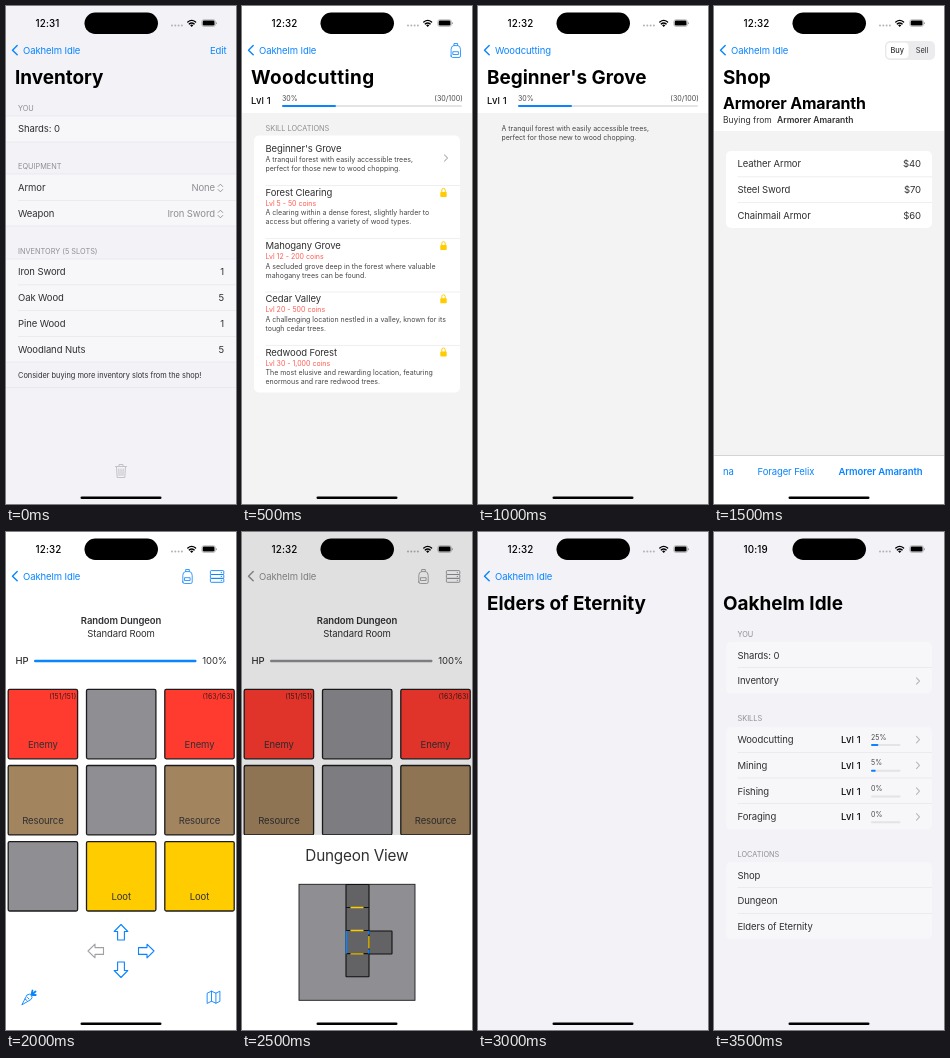
These frames come from a looping animation (230x498 px, 4000 ms). An HTML page:

```html
<!DOCTYPE html>
<html lang="en">
<head>
<meta charset="utf-8">
<title>Idle game screens</title>
<style>
  html, body { margin: 0; width: 100%; height: 100%; overflow: hidden; background: #fff; }
  svg { display: block; position: absolute; left: 0; top: 0; width: 230px; height: 498px; }
  text { font-family: Inter, Roboto, sans-serif; white-space: pre; }
  .screen { visibility: hidden; animation: show 4s step-end infinite; }
  @keyframes show {
    0% { visibility: visible; }
    12.5%, 100% { visibility: hidden; }
  }
</style>
</head>
<body>
<svg id="stage" viewBox="0 0 230 498" xmlns="http://www.w3.org/2000/svg"></svg>
<script>
const BLUE = '#0a84ff', GRAY = '#8e8e93', INK = '#303033', PALE = '#f2f2f7', ROW = '#f7f7fa', BACK = '#f3f3f3';
const APP = 'Oakhelm Idle';

// y is the middle of the capitals
function text(x, y, str, { size = 9.5, fill = INK, weight = 400, anchor = 'start', gap = size > 9 ? -0.1 : 0 } = {}) {
  return `<text x="${x}" y="${y + size * 0.364}" font-size="${size}" fill="${fill}" font-weight="${weight}" text-anchor="${anchor}" letter-spacing="${gap}">${str}</text>`;
}
const right = (x, y, str, o = {}) => text(x, y, str, { ...o, anchor: 'end' });
const center = (x, y, str, o = {}) => text(x, y, str, { ...o, anchor: 'middle' });
const small = (x, y, str, fill = '#464649') => text(x, y, str, { size: 7, fill });
const label = (x, y, str) => text(x, y, str, { size: 7.35, fill: GRAY });
const level = (x, y) => text(x, y, 'Lvl 1', { weight: 500, fill: '#111', gap: 0.15 });
const title = (str, gap = 0, y = 71, size = 18.9) => text(9, y, str, { size, weight: 700, fill: '#000', gap });

const box = (x, y, w, h, fill, r = 0, extra = '') =>
  `<rect x="${x}" y="${y}" width="${w}" height="${h}" rx="${r}" fill="${fill}" ${extra}/>`;
const line = (d, color, w = 1) =>
  `<path d="${d}" fill="none" stroke="${color}" stroke-width="${w}" stroke-linecap="round" stroke-linejoin="round"/>`;
const rule = (x, y, x2 = 218) => box(x, y - 0.25, x2 - x, 0.5, '#dedee2');
const at = (x, y, body, turn = 0) => `<g transform="translate(${x} ${y}) rotate(${turn})">${body}</g>`;
const bar = (x, y, w, part, h = 2) =>
  box(x, y - h / 2, w, h, '#e4e4e6', h / 2) + (part ? box(x, y - h / 2, w * part, h, BLUE, h / 2) : '');

const chevron = y => line(`M202.5 ${y - 3.2}l3 3.2l-3 3.2`, '#b8b8bd', 1.1);
const back = (str, color = BLUE) =>
  line('M11.2 39.6l-4.7 4.6l4.7 4.6', color, 1.4) + text(17, 44.2, str, { fill: color });

function status(time) {
  const dots = [166, 169.3, 172.6, 175.9].map(x => `<circle cx="${x}" cy="19.5" r="1" fill="#b4b4b8"/>`).join('');
  return text(29.5, 17, time, { size: 9.8, weight: 500, fill: '#000', gap: 0.15 }) + box(78.5, 6.5, 73.5, 21.5, '#000', 10.75) + dots +
    line('M181.8 16q3.9-3.2 7.8 0M183.3 17.9q2.4-1.9 4.8 0', '#000', 1.4) + '<path d="M184.1 19.2q1.6-1.2 3.2 0l-1.6 1.7z"/>' +
    box(195.8, 13.7, 13.6, 6.8, 'none', 2.1, 'stroke="#999" stroke-width=".6"') +
    box(196.7, 14.6, 11.8, 5, '#000', 1.3) + box(210.1, 16, 0.9, 2.2, '#999', 0.4);
}
const home = box(74.5, 490.4, 81, 2.6, '#000', 1.3);

const backpack = (x, color) => at(x, 44.5,
  line('M-4.7 5.5V-1Q-4.7-4.6-2-4.9H2Q4.7-4.6 4.7-1V5.5Q4.7 7 3.2 7H-3.2Q-4.7 7-4.7 5.5zM-1.8-5V-7H1.8V-5M-2.6 1.2H2.6V4H-2.6z', color, 0.8));
const rack = color => [38.6, 42.5, 46.4].map(y =>
  box(204.4, y, 13.4, 3.9, 'none', 0.9, `stroke="${color}" stroke-width=".9"`) +
  `<circle cx="215.3" cy="${y + 1.95}" r=".6" fill="${color}"/>`).join('');
const lock = y => box(198.3, y - 0.7, 6.4, 5, '#ffcc00', 0.9) +
  line(`M199.8 ${y - 0.7}v-1.8a1.7 1.7 0 0 1 3.4 0v1.8`, '#ffcc00', 1);
const arrow = (x, y, turn, color = BLUE) =>
  at(x, y, line('M0-8L6.8-1H3.4V7.5H-3.4V-1H-6.8z', color, 1.1), turn);

function inventory() {
  const items = [['Iron Sword', 1], ['Oak Wood', 5], ['Pine Wood', 1], ['Woodland Nuts', 5]];
  const gear = [['Armor', 'None', 182], ['Weapon', 'Iron Sword', 208]];
  const panel = (y, h) => box(0, y, 230, h, ROW) + rule(0, y, 230) + rule(0, y + h, 230);
  return box(0, 0, 230, 498, PALE) + status('12:31') + back(APP) +
    right(220.5, 44.2, 'Edit', { fill: BLUE }) + title('Inventory') +
    label(12, 102, 'YOU') + panel(110, 26) + text(12, 123, 'Shards: 0') +
    label(12, 160, 'EQUIPMENT') + panel(168, 52) + rule(12, 194.5, 230) +
    gear.map(([name, value, y]) => text(12, y, name) + right(209, y, value, { fill: GRAY }) +
      line(`M212.1 ${y - 1.5}l2.3-2.3l2.3 2.3M212.1 ${y + 1.5}l2.3 2.3l2.3-2.3`, GRAY, 0.9)).join('') +
    label(12, 245, 'INVENTORY (5 SLOTS)') + panel(253, 103) + rule(0, 381.5, 230) +
    items.map(([name, n], i) => {
      const y = 266 + i * 25.8;
      return text(12, y, name) + right(218, y, n) + (i ? rule(12, y - 12.9, 230) : '');
    }).join('') +
    text(12, 369, 'Consider buying more inventory slots from the shop!', { size: 7.4 }) +
    at(115, 465, line('M-5.5-4.5H5.5M-2-4.7V-6.5H2V-4.7M-4.5-4.2L-3.8 6.5H3.8L4.5-4.2M0-2V4.5M-2.2-2L-1.9 4.5M2.2-2L1.9 4.5', '#bdbdc2', 0.9));
}

const levelRow = level(9, 94.5) + small(40, 92.3, '30%') +
  right(220.8, 92.3, '(30/100)', { size: 7.1, fill: '#464649' }) + bar(40, 100, 180, 0.3);
const skillTop = (from, name, gap) => box(0, 0, 230, 498, BACK) + box(0, 0, 230, 107, '#fff') +
  status('12:32') + back(from) + title(name, gap) + levelRow;
const GROVE = ['A tranquil forest with easily accessible trees,', 'perfect for those new to wood chopping.'];

function woodcutting() {
  const places = [
    ["Beginner's Grove", '', ...GROVE],
    ['Forest Clearing', 'Lvl 5 - 50 coins', 'A clearing within a dense forest, slightly harder to', 'access but offering a variety of wood types.'],
    ['Mahogany Grove', 'Lvl 12 - 200 coins', 'A secluded grove deep in the forest where valuable', 'mahogany trees can be found.'],
    ['Cedar Valley', 'Lvl 20 - 500 coins', 'A challenging location nestled in a valley, known for its', 'tough cedar trees.'],
    ['Redwood Forest', 'Lvl 30 - 1,000 coins', 'The most elusive and rewarding location, featuring', 'enormous and rare redwood trees.']
  ];
  return skillTop(APP, 'Woodcutting', 0.4) + backpack(213.8, BLUE) + label(23.5, 122, 'SKILL LOCATIONS') +
    box(12, 129.5, 206, 257, '#fff', 5) +
    places.map(([name, cost, a, b], i) => {
      const y = i ? 133.4 + i * 53.2 : 143, d = cost ? 20.2 : 10.8;
      return text(23.5, y, name) + small(23.5, y + d, a) + small(23.5, y + d + 9.1, b) +
        (cost ? small(23.5, y + 10.8, cost, '#ff5a50') + lock(y) + rule(23.5, y - 7) : chevron(152));
    }).join('');
}

const grove = () => skillTop('Woodcutting', "Beginner's Grove") +
  GROVE.map((str, i) => small(23.5, 122 + i * 9, str)).join('');

function shop() {
  const goods = [['Leather Armor', 40], ['Steel Sword', 70], ['Chainmail Armor', 60]];
  return box(0, 0, 230, 498, '#fff') + box(0, 125, 230, 324, BACK) + status('12:32') + back(APP) +
    box(171, 35, 50, 19, '#ececee', 5) + box(172, 36.2, 23, 16.6, '#fff', 4, 'stroke="#ddd" stroke-width=".5"') +
    center(183.3, 44.5, 'Buy', { size: 7.4, weight: 500 }) + center(208, 44.5, 'Sell', { size: 7.4 }) +
    title('Shop') + title('Armorer Amaranth', -0.15, 97.5, 15.9) +
    text(9, 114, 'Buying from', { size: 8.5 }) + text(63, 114, 'Armorer Amaranth', { size: 8.5, weight: 600 }) +
    box(12, 145, 206, 77, '#fff', 5) +
    goods.map(([name, cost], i) => {
      const y = 158 + i * 25.8;
      return text(23.5, y, name) + right(207, y, '$' + cost) + (i ? rule(23.5, y - 12.9) : '');
    }).join('') +
    box(0, 449, 230, 0.6, '#b8b8bb') + text(9, 465.5, 'na', { fill: BLUE }) +
    text(43.5, 465.5, 'Forager Felix', { fill: BLUE }) +
    text(124.5, 465.5, 'Armorer Amaranth', { fill: BLUE, weight: 600 });
}

function rooms(accent) {
  const kinds = {
    E: ['#ff3b30', 'Enemy'], R: ['#a2845e', 'Resource'], L: ['#ffcc00', 'Loot'], _: [GRAY, '']
  };
  const health = { 0: '(151/151)', 2: '(163/163)' };
  const tiles = [...'E_ER_R_LL'].map((key, i) => {
    const x = 2.2 + i % 3 * 78.3, y = 157.4 + Math.floor(i / 3) * 76.1, [fill, name] = kinds[key];
    return box(x, y, 69.4, 69.4, fill, 1.5, 'stroke="#1c1c1e" stroke-width="1.3"') +
      center(x + 34.7, y + 55, name) +
      (health[i] ? right(x + 68, y + 6.8, health[i], { size: 6.9, fill: '#3a1a18' }) : '');
  }).join('');
  return box(0, 0, 230, 498, '#fff') + status('12:32') + back(APP, accent) + backpack(181.5, accent) + rack(accent) +
    center(115, 89, 'Random Dungeon', { weight: 600 }) + center(115, 102, 'Standard Room') +
    text(9.5, 129, 'HP', { weight: 500 }) + box(28, 127.8, 162.5, 2.4, accent, 1.2) +
    right(221, 129, '100%') + tiles;
}

const dungeon = () => rooms(BLUE) + arrow(115, 400.5, 0) + arrow(90, 419, -90, '#a0a0a5') + arrow(140, 419, 90) + arrow(115, 437.5, 180) +
  at(22.5, 465.5, line('M-6.5 7L-1.5-2.5Q1-4.5 3-2Q4.5 .5 2.5 2zM-3.5 1.5l2 1.5M-1 0l1.5 1.5', BLUE, 0.9) +
    line('M3-3L4-7M3.5-3L7-6M4-2.5L7.2-2.5', BLUE, 1.8)) +
  at(207.7, 465.2, line('M-6.2-4.2L-2.2-6L2.2-4L6.2-6V4.2L2.2 6L-2.2 4L-6.2 6zM-2.2-6V4M2.2-4V6', BLUE, 0.9));

function dungeonMap() {
  const spots = [[104, 352.5], [104, 375.5], [104, 398.5], [104, 421.8], [127, 399]];
  return rooms(GRAY) + box(0, 0, 230, 303, '#000', 0, 'opacity=".12"') + box(0, 303, 230, 195, '#fff') +
    center(114.8, 323, 'Dungeon View', { size: 15.3, gap: -0.2 }) +
    box(57, 352.3, 116, 116, GRAY, 0, 'stroke="#1c1c1e" stroke-width=".9"') +
    spots.map(([x, y]) => box(x, y, 23, 23, '#636366', 0.5, 'stroke="#111" stroke-width="1.1"')).join('') +
    line('M104.3 399.5V421M126.8 399.5V402M126.8 418V421', BLUE, 1.5) +
    line('M109 375.5H121M109 398.5H121M109 421.9H121M126.9 404.5V416', '#ffcc00', 1.3);
}

const elders = () => box(0, 0, 230, 498, PALE) + status('12:32') + back(APP) + title('Elders of Eternity');

function menu() {
  const skills = [['Woodcutting', 25], ['Mining', 5], ['Fishing', 0], ['Foraging', 0]];
  const card = (y, names) => box(12, y, 206, names.length * 25.75, ROW, 5) +
    names.map((name, i) => text(23.5, y + 13.1 + i * 25.75, name) + (i ? rule(23.5, y + i * 25.75) : '')).join('');
  return box(0, 0, 230, 498, PALE) + status('10:19') + title(APP) +
    label(23.5, 102, 'YOU') + card(110, ['Shards: 0', 'Inventory']) + chevron(149) +
    label(23.5, 186.5, 'SKILLS') + card(194.5, skills.map(s => s[0])) +
    skills.map(([, pct], i) => {
      const y = 207.6 + i * 25.75;
      return level(127, y) + small(157, y - 2.6, pct + '%') +
        bar(157, y + 5.3, 29.5, pct && Math.max(pct / 100, 0.16)) + chevron(y);
    }).join('') +
    label(23.5, 322, 'LOCATIONS') + card(330, ['Shop', 'Dungeon', 'Elders of Eternity']);
}

const screens = [inventory, woodcutting, grove, shop, dungeon, dungeonMap, elders, menu];
document.getElementById('stage').innerHTML = screens.map((draw, i) =>
  `<g class="screen" style="animation-delay:${i * 0.5 - 4}s">${draw()}${home}</g>`).join('');
</script>
</body>
</html>
```
